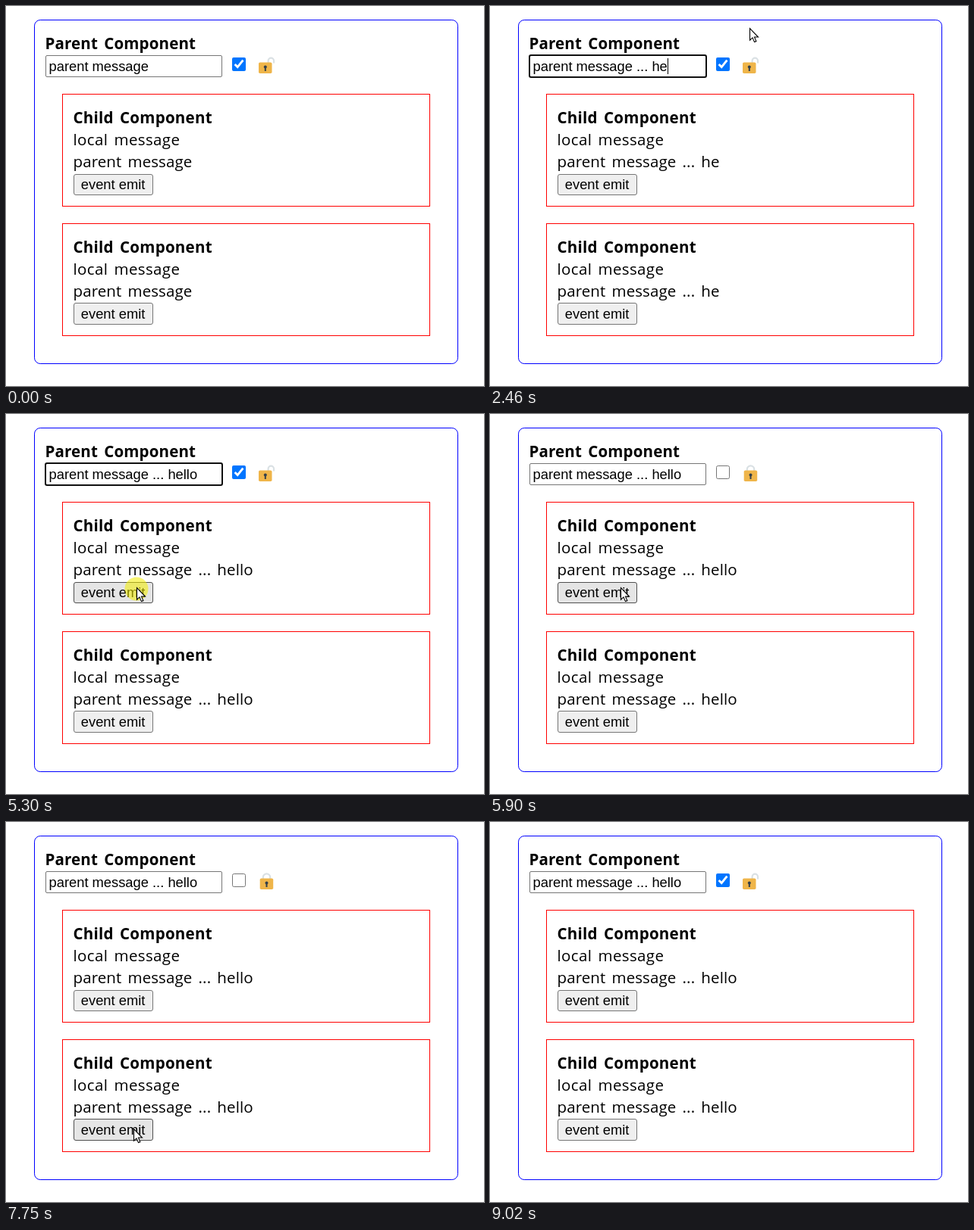
An HTML page that plays this animation: 630 px wide and 502 px high, repeating every 9610 ms.

```html
<!DOCTYPE html>
<html lang="en">
<head>
<meta charset="utf-8">
<title>Component messages</title>
<style>
html, body { margin: 0; width: 100%; height: 100%; overflow: hidden; background: #fff; }
svg { display: block; width: 630px; height: 502px; }
text { white-space: pre; font: 20.5px "Open Sans", "Noto Sans", sans-serif; word-spacing: 2.7px; letter-spacing: .1px; }
.title { font-weight: 700; letter-spacing: .25px; }
.local { letter-spacing: .35px; }
.ui { font: 18.33px "Liberation Sans", Arial, sans-serif; word-spacing: 0; letter-spacing: 0; }
.line { fill: none; stroke: #f00; }
.control { fill: #fff; stroke: #767676; }
#check { display: block; margin: 0; width: 18px; height: 18px; pointer-events: none; }
</style>
</head>
<body>
<svg viewBox="0 0 630 502">
  <rect class="line" x="37.5" y="18.5" width="558" height="454" rx="7.7" style="stroke:#00f"/>
  <text class="title" x="51.5" y="57" style="letter-spacing:.15px">Parent Component</text>
  <rect class="control" x="52.5" y="65.5" width="232" height="28" rx="1.5"/>
  <rect id="focus" x="52" y="65" width="233" height="29" rx="2" fill="none" stroke="#101010" stroke-width="2"/>
  <text class="ui" id="field" x="56.5" y="86"></text>
  <rect id="caret" y="69" width="1" height="21"/>

  <foreignObject x="298" y="68" width="18" height="18">
    <input id="check" type="checkbox" tabindex="-1" aria-label="Unlocked">
  </foreignObject>
  <g fill="none" stroke="#dae1e4" stroke-width="2.2">
    <path id="open" d="M345.6 75v-2.6a3.7 3.7 0 0 1 7.4 0v3.2"/>
    <path id="shut" d="M337.1 76v-3a4.7 4.7 0 0 1 9.4 0v3"/>
  </g>
  <g id="lock">
    <rect x="333" y="74.5" width="17.5" height="14.5" rx="1.8" fill="#efb54a"/>
    <circle cx="341.8" cy="80.6" r="2" fill="#34404a"/>
    <path d="M341.8 81v5" stroke="#34404a" stroke-width="2"/>
  </g>

  <g class="child">
    <rect class="line" x="74.5" y="116.5" width="484" height="148"/>
    <text class="title" x="88.5" y="155">Child Component</text>
    <text class="local" x="88.5" y="184">local message</text>
    <text class="message" x="88.5" y="213"></text>
    <rect class="control button" x="89.5" y="222.5" width="104" height="27" rx="2.5"/>
    <text class="ui" x="98.8" y="242">event emit</text>
  </g>

  <circle id="halo" cy="2" r="15.5" fill="#f4ee00" fill-opacity=".55"/>
  <path id="arrow" d="M.5 .5V16.2L4 12.9 6.5 18.6 8.9 17.6 6.5 12H11.5Z" fill="#fff" stroke="#000" stroke-width="1.1"/>
  <g id="beam" fill="none">
    <path id="bar" d="M-3.5-8H-1L0-7 1-8H3.5M0-7V7M-3.5 8H-1L0 7 1 8H3.5" stroke="#fff" stroke-width="2.4"/>
    <use href="#bar" style="display:none"/>
    <path d="M-3.5-8H-1L0-7 1-8H3.5M0-7V7M-3.5 8H-1L0 7 1 8H3.5" stroke="#222"/>
  </g>
</svg>
<script>
const LOOP = 9610, ROW = 171, HOLD = 100, BLINK = 500;
const FOCUS = 630, BLUR = 5320, LEAVE = 8960;
const $ = id => document.getElementById(id);
const show = (id, on) => { $(id).style.display = on ? "" : "none"; };
const within = (v, a, b) => v >= a && v < b;
const series = (first, step, count) => Array.from({ length: count }, (_, i) => first + i * step);

const svg = document.querySelector("svg");
const twin = document.querySelector(".child").cloneNode(true);
twin.setAttribute("transform", `translate(0 ${ROW})`);
svg.insertBefore(twin, $("halo"));
const messages = document.querySelectorAll(".message");
const buttons = document.querySelectorAll(".button");
// Fractional layout puts the lower button a pixel higher
buttons[1].setAttribute("y", 221.5);
buttons[1].setAttribute("height", 28);

const keys = [...series(1420, 127, 5), ...series(2110, 280, 5)];
const emits = [...series(5390, 230, 4), ...series(7240, 255, 4)];
const clicks = [FOCUS + 60, ...emits];

// Pointer moves: start, end, destination
let spot = [586, 178];
const moves = [
  [140, 540, [262, 82]],
  [720, 1000, [342, 29]],
  [3910, 4330, [494, 140]],
  [4430, 4960, [181, 394]],
  [4960, 5220, [172, 229]],
  [6320, 6775, [168, 405]],
  [8200, 8620, [490, 425]],
  [8620, LEAVE, [604, 504]]
].map(([start, end, to]) => {
  const from = spot;
  spot = to;
  return { start, end, from, to };
});

function pointer(t) {
  const move = moves.filter(m => m.start <= t).pop();
  if (!move || t >= LEAVE) return null;
  const u = Math.min(1, (t - move.start) / (move.end - move.start));
  const eased = u * u * (3 - 2 * u);
  return move.from.map((a, k) => Math.round(a + (move.to[k] - a) * eased));
}

function overText(x, y) {
  const inField = within(x, 52, 286) && within(y, 65, 95);
  return inField || within(x, 89, 274) && within((y - 132) % ROW, 0, 87);
}

function drawPointer(t) {
  const p = pointer(t), text = p && overText(...p);
  const pressed = clicks.some(c => within(t, c - HOLD, c));
  show("arrow", p && !text);
  show("beam", text);
  show("halo", p && pressed);
  buttons.forEach((b, i) => {
    const over = p && within(p[0], 89, 195) && within(p[1] - i * ROW, 222, 251);
    b.style.fill = over ? "#e5e5e5" : "#efefef";
    b.style.stroke = over ? "#4f4f4f" : "#767676";
  });
  if (!p) return;
  for (const id of ["arrow", "beam", "halo"]) $(id).setAttribute("transform", `translate(${p})`);
}

function drawField(t) {
  const typed = keys.filter(k => k <= t);
  const value = "parent message" + " ... hello".slice(0, typed.length);
  if ($("field").textContent !== value) {
    $("field").textContent = value;
    messages.forEach(m => { m.textContent = value; });
  }
  const edited = typed.length ? typed[typed.length - 1] : FOCUS;
  show("focus", within(t, FOCUS, BLUR));
  show("caret", within(t - edited, 0, BLINK));
  $("caret").setAttribute("x", Math.round(56.5 + $("field").getComputedTextLength()));
}

function drawLock(t) {
  const locked = emits.filter(c => c <= t).length % 2 === 1;
  $("check").checked = !locked;
  show("open", !locked);
  show("shut", locked);
  for (const id of ["lock", "shut"]) $(id).setAttribute("transform", `translate(${locked ? 1.7 : 0})`);
}

const start = performance.now();
function tick() {
  const t = (performance.now() - start) % LOOP;
  drawField(t);
  drawLock(t);
  drawPointer(t);
  requestAnimationFrame(tick);
}
tick();
</script>
</body>
</html>
```
